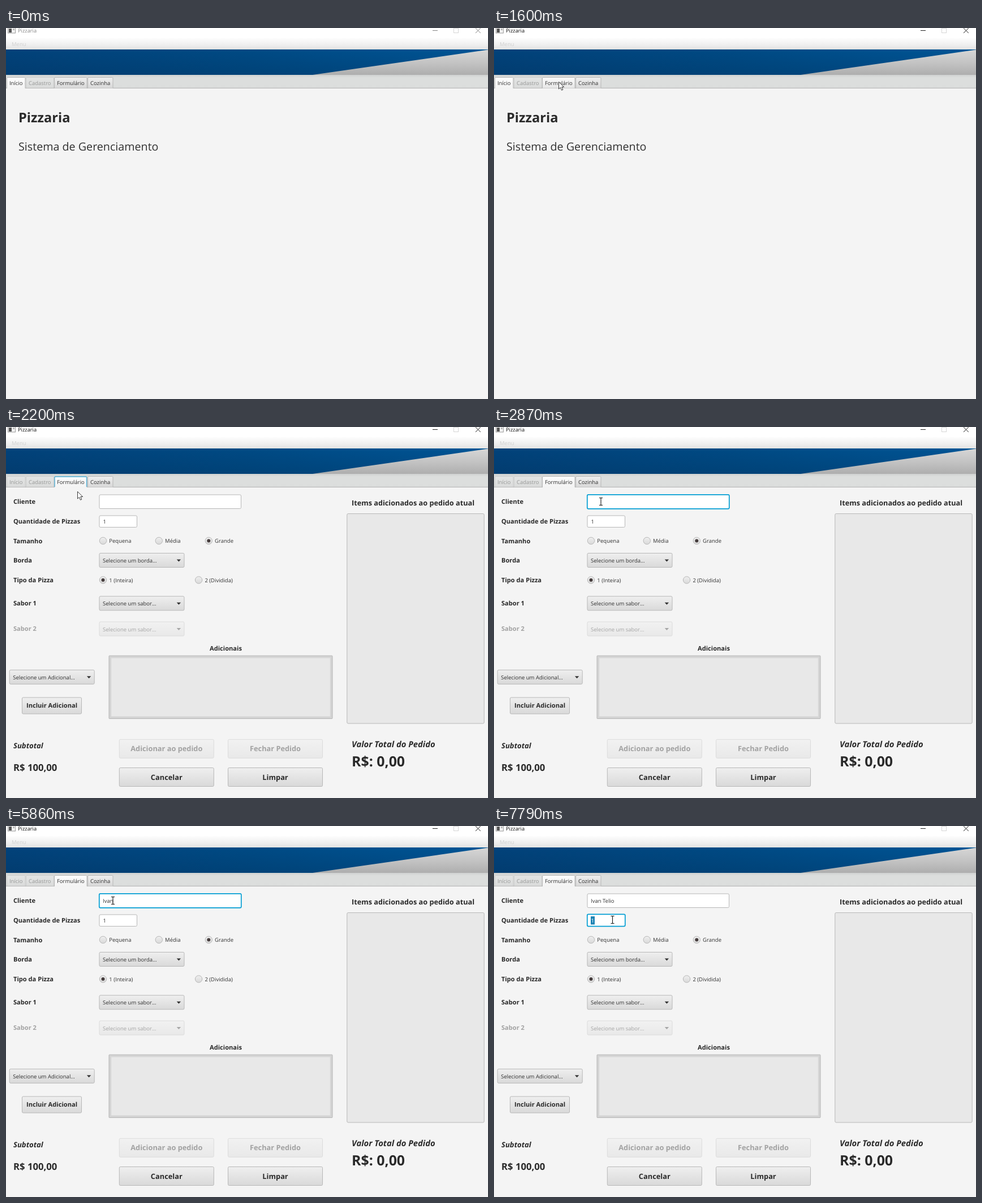
An HTML page for the animation above (8 s loop, 852 by 657 pixels).

```html
<!DOCTYPE html>
<html lang="pt">
<head>
<meta charset="utf-8">
<style>
html, body { margin: 0; width: 100%; height: 100%; overflow: hidden; background: #f4f4f4 }
svg { display: block }
text { font-family: "Open Sans", "Noto Sans", sans-serif; font-size: 9.5px; fill: #323232; text-rendering: geometricPrecision; white-space: pre }
.b { font-weight: 700; fill: #2a2a2a }
.i { font-style: italic }
.off { opacity: .4 }
.box { stroke: #b7b7b7 }
.focus { fill: #fff; stroke: #039ed3; stroke-width: 1.7 }
</style>
</head>
<body>
<svg id="stage" width="852" height="657" viewBox="0 0 852 657"></svg>
<script>
const LOOP = 8000, NAME = 'Ivan Telio';

const text = (x, y, s, extra = '') => `<text x="${x}" y="${y}" ${extra}>${s}</text>`;
const bold = (x, y, s, size = 11.1, extra = '') =>
  `<text class="b" x="${x}" y="${y}" style="font-size:${size}px" ${extra}>${s}</text>`;
const slanted = (x, y, s, size) => `<g class="i">${bold(x, y, s, size)}</g>`;
const rect = (x, y, w, h, fill, extra = '') =>
  `<rect x="${x}" y="${y}" width="${w}" height="${h}" fill="${fill}" ${extra}/>`;
const box = (x, y, w, h, fill, r = 2) => rect(x, y, w, h, fill, `rx="${r}" class="box"`);
const group = (s, attrs) => `<g ${attrs}>${s}</g>`;
const off = s => group(s, 'class="off"');
const gradient = (id, stops, dir = 'x2="0" y2="1"') =>
  `<linearGradient id="${id}" ${dir}>${stops.map((c, i) =>
    `<stop offset="${i / (stops.length - 1)}" stop-color="${c}"/>`).join('')}</linearGradient>`;

const combo = (x, y, s) => box(x, y, 150, 25, 'url(#btn)') + text(x + 6, y + 16.6, s) +
  `<path d="M${x + 136.7} ${y + 11}h7.4l-3.7 4z" fill="#333"/>`;
const button = (x, y, w, h, s, size) => box(x, y, w, h, 'url(#btn)') +
  bold(x + w / 2, y + h / 2 + size * .36, s, size, 'text-anchor="middle"');
const radio = (x, y, s, on) =>
  `<circle cx="${x}" cy="${y}" r="6.2" fill="url(#btn)" class="box"/>` +
  (on ? `<circle cx="${x}" cy="${y}" r="3" fill="#453c3c"/>` : '') + text(x + 10.8, y + 3.8, s);

const tab = (x, w, s, id = '') => {
  const shape = `M${x} 106.5V89q0-1.5 1.5-1.5h${w - 3}q1.5 0 1.5 1.5V106.5`;
  return `<path id="${id}" d="${shape}" fill="url(#tab)" class="box"/>` + text(x + 4.4, 101.3, s);
};
const openTab = (x, w, s) =>
  `<path d="M${x} 107V89q0-1.5 1.5-1.5h${w - 3}q1.5 0 1.5 1.5V107" fill="url(#open)" class="box"/>` +
  rect(x + .5, 106, w - 1, 1.5, '#f4f4f4') + text(x + 4.4, 101.3, s);

const defs = '<defs>' +
  gradient('bar', ['#fdfdfd', '#f1f1f1', '#e2e2e2']) +
  gradient('blue', ['#02427a', '#004a84', '#005596'], 'x2="1" y2="0"') +
  gradient('shade', ['#00305a00', '#00305a50']) +
  gradient('gray', ['#d6d6d6', '#c4c4c4', '#aeaeae']) +
  gradient('head', ['#cfd1d1', '#dcdedd', '#dcdedd', '#dcdedd', '#dcdedd', '#d9dbda']) +
  gradient('btn', ['#efefef', '#e4e4e4', '#d9d9d9']) +
  gradient('tab', ['#efefef', '#e4e4e4', '#d8d8d8']) +
  gradient('hover', ['#fafafa', '#f1f1f1', '#e6e6e6']) +
  gradient('open', ['#ffffff', '#f6f6f6', '#f4f4f4']) + '</defs>';

const frame = rect(0, 0, 852, 19, '#fff') +
  rect(3.5, -.5, 13, 9.5, '#f4f4f4', 'stroke="#999"') + rect(5, 1, 5, 7, '#555') +
  rect(12, 1, 3, 3, '#bbb') +
  group(text(21, 8.3, 'Pizzaria', 'style="font-size:9.3px;fill:inherit"') +
    '<path d="M754 4.5h9M830 .2l8.8 8.8M838.8 .2l-8.8 8.8" fill="none"/>', 'id="title"') +
  '<rect x="791.5" y=".5" width="8" height="8" fill="none" stroke="#d6d6d6"/>' +
  rect(0, 18, 852, 20, 'url(#bar)') + text(10, 32, 'Menu', 'style="fill:#d0d0d0"') +
  rect(0, 38, 852, 45, 'url(#blue)') + rect(0, 38, 852, 45, 'url(#shade)') +
  '<path d="M542 83L852 38.5V83z" fill="url(#gray)"/>' +
  rect(0, 83, 852, 24, 'url(#head)') + rect(0, 106, 852, 1, '#b4b4b4') +
  off(tab(35.5, 49, 'Cadastro')) + tab(144.5, 44.5, 'Cozinha');

const home = tab(85.5, 57.5, 'Formulário', 'hoverTab') + openTab(1.5, 32.5, 'Início') +
  bold(22, 167, 'Pizzaria', 23.6) +
  text(22, 216.8, 'Sistema de Gerenciamento', 'style="font-size:19.7px"');

const form = off(tab(1.5, 32.5, 'Início')) + openTab(85.5, 57.5, 'Formulário') +
  '<path id="ring" d="M86 106V89.5q0-1.5 1.5-1.5h53.5q1.5 0 1.5 1.5V106" fill="none" stroke="#4fb2da" stroke-width="1.3"/>' +
  ['Cliente', 'Quantidade de Pizzas', 'Tamanho', 'Borda', 'Tipo da Pizza', 'Sabor 1']
    .map((s, i) => bold(13, [136.3, 171, 206, 240.3, 275, 316.3][i], s)).join('') +
  off(bold(13, 361.3, 'Sabor 2')) +
  box(165, 120, 250.5, 24.5, '#fff') + box(165, 157, 66.5, 20.5, '#fff') +
  rect(164.8, 119.8, 251, 25, '#fff', 'id="nameFocus" rx="2" class="focus"') +
  rect(164.8, 156.4, 67, 21.2, '#fff', 'id="countFocus" rx="2" class="focus"') +
  text(171, 136, '', 'id="name"') + rect(0, 125.5, 1, 14, '#333', 'id="caret"') +
  rect(171, 160, 7, 14.5, '#1f84b4', 'id="mark"') + text(171.6, 170.6, '1', 'id="count"') +
  radio(171.5, 201.5, 'Pequena') + radio(270.3, 201.5, 'Média') + radio(358.3, 201.5, 'Grande', true) +
  combo(165, 223.5, 'Selecione um borda...') +
  radio(171.5, 271, '1 (Inteira)', true) + radio(340.6, 271, '2 (Dividida)') +
  combo(165, 299.8, 'Selecione um sabor...') + off(combo(165, 345, 'Selecione um sabor...')) +
  bold(360, 396, 'Adicionais') +
  box(182, 405, 395, 111.5, '#d3d3d3', 1) + rect(186, 409, 387, 103.5, '#e8e8e8', 'stroke="#dedede"') +
  combo(6.2, 430.3, 'Selecione um Adicional...') + button(28.5, 479, 105, 29, 'Incluir Adicional', 11.1) +
  off(button(200.3, 553.3, 167, 33, 'Adicionar ao pedido', 12.8) +
    button(392.5, 553.3, 167, 33, 'Fechar Pedido', 12.8)) +
  button(200.3, 603.5, 167, 33, 'Cancelar', 12.8) + button(392.5, 603.5, 167, 33, 'Limpar', 12.8) +
  slanted(13, 569, 'Subtotal', 13.1) + bold(13, 608.5, 'R$ 100,00', 16.7) +
  bold(611, 139, 'Items adicionados ao pedido atual', 12.7) + box(602.8, 153.5, 242.4, 371.5, '#e8e8e8') +
  slanted(611, 567, 'Valor Total do Pedido', 14.8) + bold(611, 600.8, 'R$: 0,00', 24.9);

const pointers =
  '<path id="arrow" d="M.5 .3V13l3-2.7 2 4.9 2.3-1-2-4.7h3.9z" fill="#fff" stroke="#222" stroke-width=".9"/>' +
  '<path id="beam" d="M-3-6.5h2.2q.8 0 .8.8V5.7q0 .8-.8.8H-3M3-6.5H.8q-.8 0-.8.8V5.7q0 .8.8.8H3" fill="none" stroke="#111" stroke-width="1.1"/>';

stage.innerHTML = defs + frame + group(home, 'id="home"') + group(form, 'id="form"') + pointers;
const el = {};
stage.querySelectorAll('[id]').forEach(e => el[e.id] = e);

// Stepped pointer positions: time, x, y
const path = [
  [520, 630, 608], [590, 545, 500], [660, 430, 385], [730, 310, 290], [800, 205, 225],
  [870, 149, 199], [930, 134, 165], [1000, 124, 130], [1070, 117, 106], [1140, 114, 95],
  [1760, 117, 101], [1840, 121, 107], [1920, 124, 111], [2000, 126, 114],
  [2280, 130, 115], [2350, 138, 118], [2420, 149, 122], [2490, 161, 126], [2560, 172, 129],
  [2640, 181, 131], [2710, 187, 132], [2780, 189, 132],
  [7040, 192, 138], [7110, 199, 149], [7180, 206, 160], [7250, 209, 165], [7580, 209.5, 166]
];
const keyTimes = [4080, 4280, 4410, 4870, 5330, 6000, 6190, 6390, 6530, 6580];
const blinks = [2930, 3480, 3680, 5860, 5930, 7040, 7250, 7650];

const passed = (times, t) => times.filter(k => t >= k).length;
const show = (e, on) => e.setAttribute('display', on ? 'inline' : 'none');

function draw(t) {
  const active = t >= 1600, inForm = t >= 2200;
  const nameFocus = t >= 2850 && t < 7650, countFocus = t >= 7650;
  el.title.setAttribute('fill', active ? '#111' : '#888');
  el.title.setAttribute('stroke', 'none');
  el.title.lastChild.setAttribute('stroke', active ? '#222' : '#858585');
  el.hoverTab.setAttribute('fill', t >= 1070 ? 'url(#hover)' : 'url(#tab)');
  show(el.home, !inForm);
  show(el.form, inForm);
  show(el.ring, t < 2850);
  show(el.nameFocus, nameFocus);
  show(el.countFocus, countFocus);
  show(el.mark, countFocus);
  el.count.style.fill = countFocus ? '#fff' : '#323232';

  el.name.textContent = NAME.slice(0, passed(keyTimes, t));
  show(el.caret, passed(blinks, t) % 2);
  if (inForm) el.caret.setAttribute('x', Math.round(171 + el.name.getComputedTextLength()));

  const [, x, y] = path[passed(path.map(p => p[0]), t) - 1] || [0, -99, -99];
  const overField = inForm && x >= 165 && y >= 120;
  show(el.arrow, !overField);
  show(el.beam, overField);
  (overField ? el.beam : el.arrow).setAttribute('transform', `translate(${x} ${y})`);
}

const start = performance.now();
function tick() {
  draw((performance.now() - start) % LOOP);
  requestAnimationFrame(tick);
}
tick();
</script>
</body>
</html>
```
